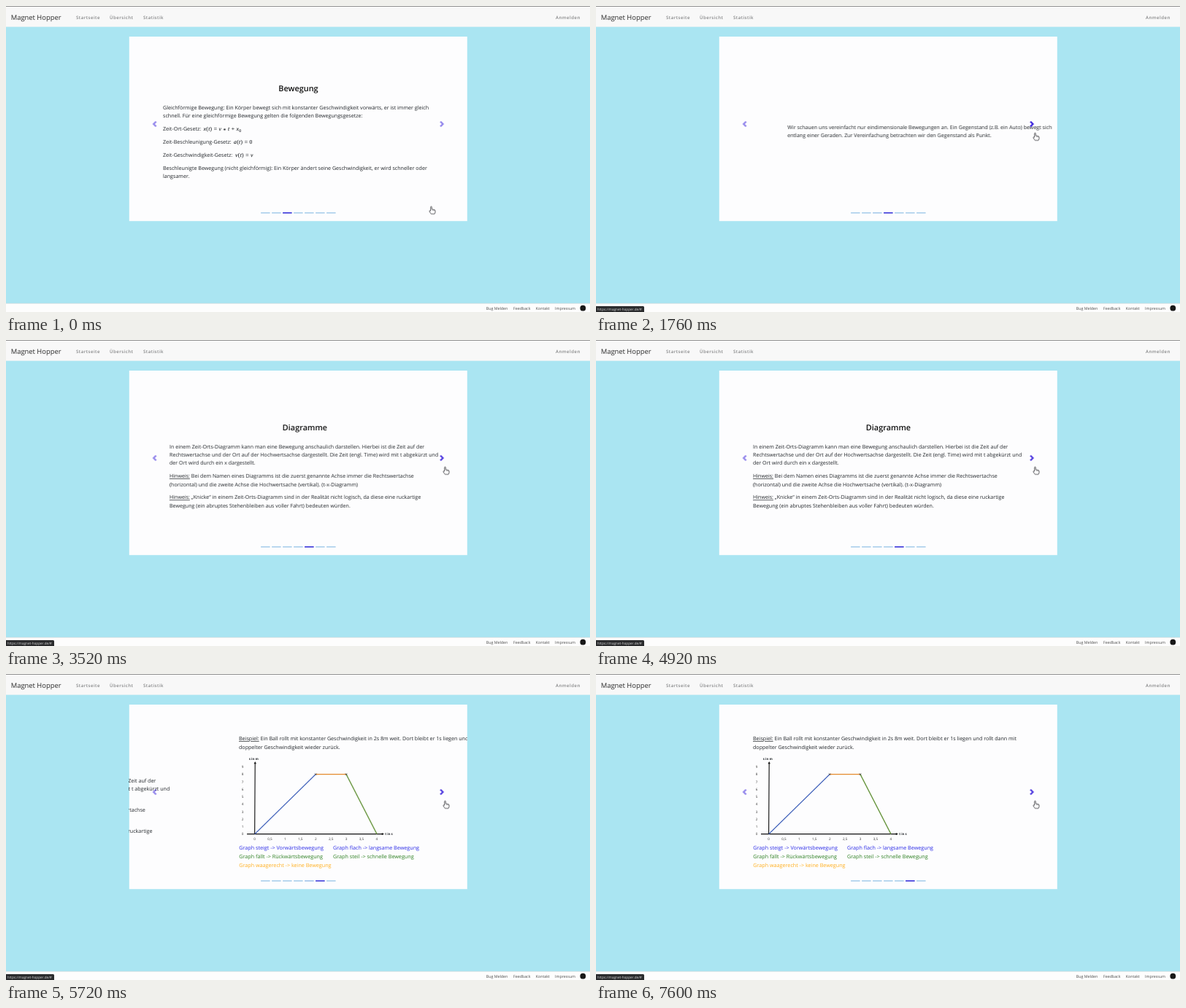
An HTML page that plays this animation: 800x420 px, repeating every 7.64 s.

```html
<!DOCTYPE html>
<html lang="de">
<head>
<meta charset="utf-8">
<title>Magnet Hopper</title>
<style>
  html, body { margin: 0; width: 100%; height: 100%; overflow: hidden; background: #aae5f2; }
  svg { display: block; width: 100%; height: 100%; }
  text {
    font: 7.12px "Open Sans", "Noto Sans", sans-serif;
    fill: #212529;
    text-rendering: geometricPrecision;
  }
  .brand { font-size: 9.4px; fill: #2a2a2a; }
  .nav text { font-size: 6.1px; font-weight: 600; letter-spacing: .45px; fill: #868788; }
  .foot text { font-size: 5.3px; fill: #4c4c4c; }
  .title { font-size: 10.9px; font-weight: 600; text-anchor: middle; fill: #111; }
  .math { font: 7.6px "Liberation Serif", "Noto Serif", serif; letter-spacing: .35px; stroke: #212529; stroke-width: .12px; }
  .math .v { font-style: italic; }
  .u { text-decoration: underline; }
  .caption text { font-size: 7.2px; }
  .caption .blue { fill: #2a2ae6; }
  .caption .green { fill: #2c7f20; }
  .caption .orange { fill: #ffae1c; }
  .ticks text { font-size: 4.6px; fill: #333; text-anchor: middle; }
  .unit { font-size: 4.4px; font-weight: 700; }
  .status text { font-size: 4.65px; fill: #d8d8d8; }

  /* All parts share one 7640 ms loop. */
  .track, .status, .next, .hand, .on { animation: 7640ms linear infinite; }
  .track { animation-name: slide; }
  .status { animation-name: status; }
  .next { animation-name: hover; }
  .hand { animation-name: hand; }
  .on { fill: #3f30dc; }
  .on3 { animation-name: on3; }
  .on4 { animation-name: on4; }
  .on5 { animation-name: on5; }
  .on6 { animation-name: on6; }

  @keyframes slide {
    0% { transform: translateX(0); }
    16.95% { transform: translateX(0); animation-timing-function: ease-in-out; }
    24.8% { transform: translateX(-463px); }
    39.01% { transform: translateX(-463px); animation-timing-function: ease-in-out; }
    46.86% { transform: translateX(-926px); }
    69.605% { transform: translateX(-926px); animation-timing-function: ease-in-out; }
    77.46%, 100% { transform: translateX(-1389px); }
  }
  @keyframes on3 {
    0% { opacity: 1; }
    16.95% { opacity: 1; animation-timing-function: ease; }
    24.8%, 100% { opacity: 0; }
  }
  @keyframes on4 {
    0% { opacity: 0; }
    16.95% { opacity: 0; animation-timing-function: ease; }
    24.8% { opacity: 1; }
    39.01% { opacity: 1; animation-timing-function: ease; }
    46.86%, 100% { opacity: 0; }
  }
  @keyframes on5 {
    0% { opacity: 0; }
    39.01% { opacity: 0; animation-timing-function: ease; }
    46.86% { opacity: 1; }
    69.605% { opacity: 1; animation-timing-function: ease; }
    77.46%, 100% { opacity: 0; }
  }
  @keyframes on6 {
    0% { opacity: 0; }
    69.605% { opacity: 0; animation-timing-function: ease; }
    77.46%, 100% { opacity: 1; }
  }
  @keyframes status {
    0%, 12.56% { opacity: 0; }
    12.57%, 100% { opacity: 1; }
  }
  @keyframes hover {
    0%, 7.6% { opacity: .55; }
    9.6%, 16.9% { opacity: .87; }
    18.9%, 32% { opacity: 1; }
    34%, 100% { opacity: .87; }
  }
  @keyframes hand {
    0%, .4% { transform: translate(584px, 280.2px); animation-timing-function: ease-in-out; }
    4.8% { transform: translate(696px, 224px); animation-timing-function: ease-in-out; }
    9.95%, 100% { transform: translate(603px, 179.2px); }
  }
</style>
</head>
<body>
<svg viewBox="0 0 800 420">
  <defs>
    <clipPath id="card"><rect x="168.8" y="42" width="463" height="253.2"/></clipPath>
    <path id="chevron" d="M-1.3-4.17L-2.87-2.6-.26 0-2.87 2.6-1.3 4.17 2.87 0Z" fill="#3a22dc"/>
    <path id="cross" d="M-1.2-1.2L1.2 1.2M1.2-1.2L-1.2 1.2" stroke="#222" stroke-width=".7"/>
  </defs>

  <rect width="800" height="420" fill="#aae5f2"/>

  <rect width="800" height="28.6" fill="#f8f8f8"/>
  <rect width="800" height="1" fill="#929292"/>
  <text class="brand" x="6.8" y="18.6">Magnet Hopper</text>
  <g class="nav">
    <text x="96" y="17.6">Startseite</text>
    <text x="142" y="17.6">Übersicht</text>
    <text x="188" y="17.6">Statistik</text>
    <text x="753" y="17.6">Anmelden</text>
  </g>

  <rect x="168.8" y="42" width="463" height="253.2" fill="#fdfdfe"/>
  <g clip-path="url(#card)">
    <g class="track">
      <g>
        <text class="title" x="400.5" y="117">Bewegung</text>
        <text y="142.2">
          <tspan x="215">Gleichförmige Bewegung: Ein Körper bewegt sich mit konstanter Geschwindigkeit vorwärts, er ist immer gleich</tspan>
          <tspan x="215" dy="11.25">schnell. Für eine gleichförmige Bewegung gelten die folgenden Bewegungsgesetze:</tspan>
          <tspan x="215" dy="17.9">Zeit-Ort-Gesetz:</tspan>
          <tspan x="215" dy="17.9">Zeit-Beschleunigung-Gesetz:</tspan>
          <tspan x="215" dy="17.9">Zeit-Geschwindigkeit-Gesetz:</tspan>
          <tspan x="215" dy="17.9">Beschleunigte Bewegung (nicht gleichförmig): Ein Körper ändert seine Geschwindigkeit, er wird schneller oder</tspan>
          <tspan x="215" dy="11.25">langsamer.</tspan>
        </text>
        <text class="math" x="270.5" y="171.4"><tspan class="v">x</tspan>(<tspan class="v">t</tspan>) = <tspan class="v">v</tspan> <tspan dy="1.3">*</tspan> <tspan class="v" dy="-1.3">t</tspan> + <tspan class="v">x</tspan><tspan dy="1.2" font-size="5.6">0</tspan></text>
        <text class="math" x="312" y="189.3"><tspan class="v">a</tspan>(<tspan class="v">t</tspan>) = 0</text>
        <text class="math" x="314" y="207.2"><tspan class="v">v</tspan>(<tspan class="v">t</tspan>) = <tspan class="v">v</tspan></text>
      </g>

      <g transform="translate(463)">
        <text y="169.2">
          <tspan x="215">Wir schauen uns vereinfacht nur eindimensionale Bewegungen an. Ein Gegenstand (z.B. ein Auto) bewegt sich</tspan>
          <tspan x="215" dy="11.25">entlang einer Geraden. Zur Vereinfachung betrachten wir den Gegenstand als Punkt.</tspan>
        </text>
      </g>

      <g transform="translate(926)">
        <text class="title" x="400.5" y="123.6">Diagramme</text>
        <text y="148.9">
          <tspan x="215">In einem Zeit-Orts-Diagramm kann man eine Bewegung anschaulich darstellen. Hierbei ist die Zeit auf der</tspan>
          <tspan x="215" dy="11.25">Rechtswertachse und der Ort auf der Hochwertsachse dargestellt. Die Zeit (engl. Time) wird mit t abgekürzt und</tspan>
          <tspan x="215" dy="11.25">der Ort wird durch ein x dargestellt.</tspan>
          <tspan x="215" dy="17.9"><tspan class="u">Hinweis:</tspan> Bei dem Namen eines Diagramms ist die zuerst genannte Achse immer die Rechtswertachse</tspan>
          <tspan x="215" dy="11.25">(horizontal) und die zweite Achse die Hochwertsache (vertikal). (t-x-Diagramm)</tspan>
          <tspan x="215" dy="17.9"><tspan class="u">Hinweis:</tspan> „Knicke“ in einem Zeit-Orts-Diagramm sind in der Realität nicht logisch, da diese eine ruckartige</tspan>
          <tspan x="215" dy="11.25">Bewegung (ein abruptes Stehenbleiben aus voller Fahrt) bedeuten würden.</tspan>
        </text>
      </g>

      <g transform="translate(1389)">
        <text y="91.3">
          <tspan x="215"><tspan class="u">Beispiel:</tspan> Ein Ball rollt mit konstanter Geschwindigkeit in 2s 8m weit. Dort bleibt er 1s liegen und rollt dann mit</tspan>
          <tspan x="215" dy="11.25">doppelter Geschwindigkeit wieder zurück.</tspan>
        </text>
        <g fill="none" stroke-width="1.3">
          <path d="M236.6 219.6L237.2 122M226 219.6H412" stroke="#111" stroke-width="1.15"/>
          <path d="M235.5 123.2L237.2 120 238.9 123.2ZM410.8 217.9L414 219.6 410.8 221.3Z" fill="#111"/>
          <path d="M236.8 219.6L320.2 137.6" stroke="#3558b6"/>
          <path d="M320.2 137.6H362" stroke="#e58a2c"/>
          <path d="M362 137.6L404 219.6" stroke="#66943c"/>
          <use href="#cross" x="320.2" y="137.6"/>
          <use href="#cross" x="362" y="137.6"/>
        </g>
        <text class="unit" x="228.8" y="118.4">s in m</text>
        <text class="unit" x="415.2" y="221">t in s</text>
        <g class="ticks" id="ticks"></g>
        <g class="caption">
          <text class="blue" x="215.3" y="241.1">Graph steigt -&gt; Vorwärtsbewegung</text>
          <text class="blue" x="344" y="241.1">Graph flach -&gt; langsame Bewegung</text>
          <text class="green" x="215.3" y="253.1">Graph fällt -&gt; Rückwärtsbewegung</text>
          <text class="green" x="344" y="253.1">Graph steil -&gt; schnelle Bewegung</text>
          <text class="orange" x="215.3" y="265.1">Graph waagerecht -&gt; keine Bewegung</text>
        </g>
      </g>
    </g>
  </g>

  <g transform="translate(203.5 162) scale(-1 1)" opacity=".55"><use href="#chevron"/></g>
  <g transform="translate(597.2 162)"><use class="next" href="#chevron"/></g>

  <g id="bars" fill="#a3cbea"></g>

  <rect y="408" width="800" height="12" fill="#fdfdfd"/>
  <rect y="407.8" width="800" height=".7" fill="#c3d6da"/>
  <g class="foot">
    <text x="657.8" y="416.8">Bug Melden</text>
    <text x="695" y="416.8">Feedback</text>
    <text x="725.8" y="416.8">Kontakt</text>
    <text x="752" y="416.8">Impressum</text>
  </g>
  <circle cx="790.3" cy="414.7" r="3.9" fill="#181818"/>

  <g class="status">
    <path d="M0 412H64.5Q66 412 66 413.5V420H0Z" fill="#2a2b2d"/>
    <text x="1.8" y="417.9">https://magnet-hopper.de/#</text>
  </g>

  <g class="hand" fill="#fff" stroke="#333338" stroke-width=".8" stroke-linejoin="round">
    <path d="M-2.3 1V-4.2a.8.8 0 0 1 1.6 0V-1.2L3-.5Q4-.2 4 .8V2.6Q4 4 3 5.2H-1.6Q-2.6 3.6-4 2Q-4.3.8-3.4.6Z"/>
    <path d="M.8-.8V.8M2.4-.5V1" fill="none" stroke-width=".5"/>
  </g>
</svg>

<script>
  const add = (parent, tag, attrs, label = '') => {
    const el = document.createElementNS('http://www.w3.org/2000/svg', tag);
    for (const key in attrs) el.setAttribute(key, attrs[key]);
    el.textContent = label;
    parent.append(el);
  };

  const ticks = document.getElementById('ticks');
  for (let i = 0; i <= 9; i++) {
    add(ticks, 'text', { x: 220, y: 221.2 - i * 10.23 }, i);
  }
  for (let i = 0; i <= 8; i++) {
    add(ticks, 'text', { x: 236.6 + i * 20.9, y: 228 }, String(i / 2).replace('.', ','));
  }

  const bars = document.getElementById('bars');
  const bar = (i, cls) =>
    add(bars, 'rect', { x: 349.1 + i * 15, y: 283.2, width: 12.5, height: 1.5, class: cls });
  for (let i = 0; i < 7; i++) bar(i, 'off');
  for (let i = 2; i < 6; i++) bar(i, `on on${i + 1}`);
</script>
</body>
</html>
```
